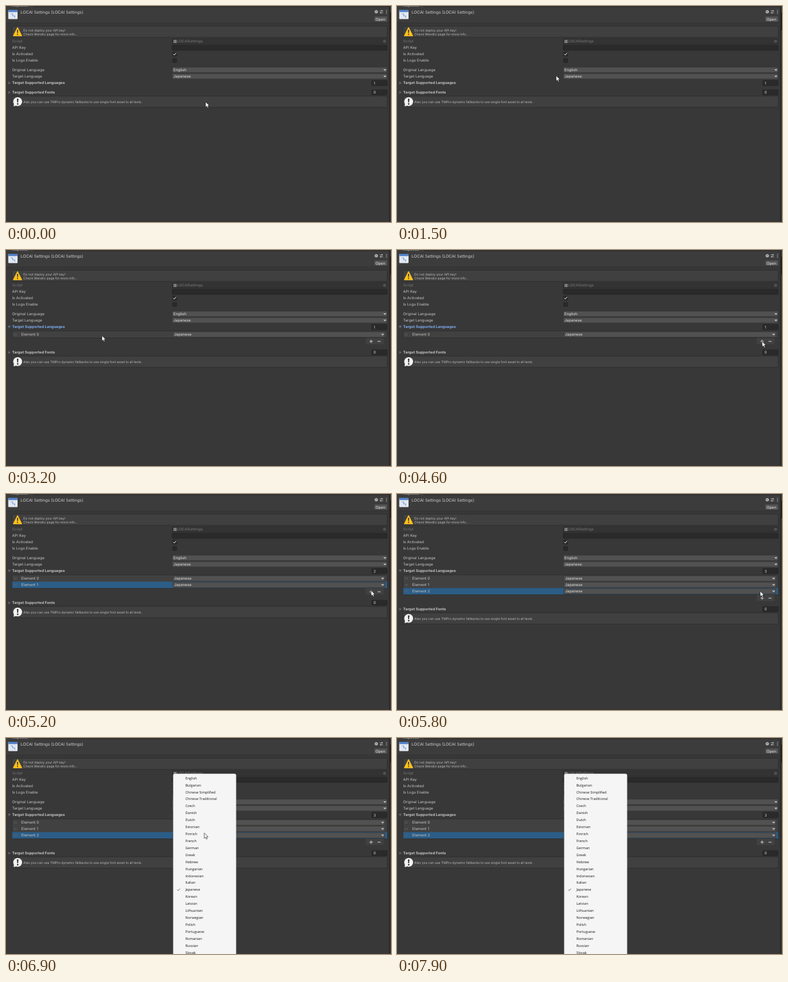
Animation, 600 px wide and 338 px high, one loop 8 s. Source, as an HTML page:

```html
<!DOCTYPE html>
<html lang="en">
<head>
<meta charset="utf-8">
<title>Settings inspector</title>
<style>
  html, body { margin: 0; width: 100%; height: 100%; overflow: hidden; background: #383838; }
  svg { display: block; width: 100vw; height: 100vh; }
  text { font-family: Inter, sans-serif; text-rendering: geometricPrecision; white-space: pre; }
  .menu text { font-family: "Open Sans", sans-serif; }
</style>
</head>
<body>
<svg id="stage" viewBox="0 0 600 338"></svg>
<script>
const LOOP = 8000, STEP = 100;
const OPEN_AT = 2400, ADD_AT = [4800, 5600], MENU_AT = 6510, MENU_FADE = 200;
const LABEL = '#c4c4c4', DIM = '#787878', FIELD = '#2a2a2a', BUTTON = '#515151', EDGE = '#282828', FOCUS = '#7eaef0';
const LANGUAGES = ('English,Bulgarian,Chinese Simplified,Chinese Traditional,Czech,Danish,Dutch,Estonian,' +
  'Finnish,French,German,Greek,Hebrew,Hungarian,Indonesian,Italian,Japanese,Korean,Latvian,' +
  'Lithuanian,Norwegian,Polish,Portuguese,Romanian,Russian,Slovak').split(',');

// Pointer stops: time, x, y
const STOPS = [
  [0, 311, 150], [300, 311, 150], [900, 352, 119], [1500, 248, 109], [1900, 130, 127],
  [2200, 62, 119], [2500, 62, 119], [3200, 149.5, 134], [4100, 569, 143], [4800, 569, 143],
  [5300, 569, 152], [5700, 566, 152], [5800, 566, 152], [6400, 309, 149], [6500, 309, 147],
  [6600, 309, 141.5], [7000, 309, 150], [7900, 308, 342], [8000, 308, 342]
];

const rect = (x, y, w, h, fill, more = '') =>
  `<rect x="${x}" y="${y}" width="${w}" height="${h}" fill="${fill}" ${more}/>`;
const path = (d, fill, more = '') => `<path d="${d}" fill="${fill}" ${more}/>`;
const line = (d, color, width = 0.8) => path(d, 'none', `stroke="${color}" stroke-width="${width}"`);
const circle = (x, y, r, fill, more = '') => `<circle cx="${x}" cy="${y}" r="${r}" fill="${fill}" ${more}/>`;
// y is the middle of the capitals
const text = (s, x, y, fill = LABEL, size = 5.88, weight = 400) =>
  `<text x="${x}" y="${y + size * 0.36}" fill="${fill}" font-size="${size}" font-weight="${weight}">${s}</text>`;

const box = (x, y, w, h, fill, edge = EDGE) =>
  rect(x, y, w, h, fill, `rx="1" stroke="${edge}" stroke-width=".6"`);
const tick = (x, y, color) => line(`M${x} ${y}l1.6 1.7l3-3.6`, color, 1);
const helpBox = y => box(9.3, y - 9, 585, 17.6, '#404040', '#272727');

function dropdown(value, x, right, y) {
  return box(x, y - 4.2, right - x, 8.4, BUTTON, '#303030') + text(value, x + 2, y, '#e0e0e0') +
    path(`M${right - 6} ${y - 1}h5l-2.5 2.6z`, LABEL);
}

function foldout(label, y, count, open, color = LABEL) {
  const arrow = open ? `M2.6 ${y - 1.8}h4.8l-2.4 4z` : `M3.6 ${y - 2.3}v4.6l3.6-2.3z`;
  return path(arrow, color === FOCUS ? '#55718f' : '#666') + text(label, 9.6, y, color, 5.8, 700) +
    box(570, y - 4, 24, 8, FIELD, '#202020') + text(count, 572.7, y, '#d2d2d2');
}

function header() {
  return rect(0, 0, 597, 26, '#3c3c3c') + rect(0, 0, 597, 2, '#323232') + rect(0, 0, 42, 2, '#3c3c3c') +
    text('Inspector', 9, -1.6) + line('M0 26.5H597', '#303030', 0.6) +
    rect(3.5, 6, 14.5, 14.5, '#e3e9f2', 'rx="1"') + rect(3.5, 6, 14.5, 3.4, '#4f7fc4', 'rx="1"') +
    line('M7.5 12.5h3v3h3v2.5', '#7ea3d8', 1.2) +
    text('LOCAI Settings (LOCAI Settings)', 22.8, 9.2, '#d0d0d0', 6.42) +
    circle(577, 9, 2.5, LABEL) + text('?', 575.6, 9, '#333', 4.4, 700) +
    line('M582.5 7.6h5M582.5 10.6h5M586 6.2v2.8M584 9.2v2.8', LABEL, 0.8) +
    [6.6, 9, 11.4].map(y => circle(593, y, 0.7, LABEL)).join('') +
    box(573.5, 16, 21, 8.8, '#555', '#303030') + text('Open', 576, 20.4, '#e8e8e8', 5.9);
}

function settings() {
  return helpBox(40.4) +
    path('M18 33.8L24.4 46.6H11.6z', '#fcc21b', 'stroke="#fcc21b" stroke-width="1.2" stroke-linejoin="round"') +
    path('M17.1 37.6h1.8l-.4 4.8h-1z', '#222') + circle(18, 44.4, 0.9, '#222') +
    text('Do not deploy your API key!', 27, 38, '#bdbdbd', 5.02) +
    text('Check Wendro page for more info...', 27, 43.9, '#bdbdbd', 5.02) +
    text('Script', 9.4, 55.3, DIM) + box(259, 51.2, 335, 8.2, '#333', '#2c2c2c') +
    rect(261, 53, 4.8, 4.8, '#8a8a8a') + line('M261 54.8h4.8M262.7 53v4.8', '#555', 0.5) +
    text('LOCAISettings', 266.6, 55.3, DIM) +
    circle(590, 55.3, 2, 'none', 'stroke="#777" stroke-width=".6"') + circle(590, 55.3, 0.8, '#777') +
    text('API Key', 9.4, 65.3) + box(259, 61.3, 335, 8, FIELD, '#202020') +
    text('Is Activated', 9.4, 75.3) + box(259.6, 72, 6.4, 6.4, FIELD, '#202020') + tick(260.6, 75.2, '#eee') +
    text('Is Logs Enable', 9.4, 85.3) + box(259.6, 82, 6.4, 6.4, FIELD, '#202020') +
    text('Original Language', 9.4, 100) + dropdown('English', 259, 594, 100) +
    text('Target Language', 9.4, 110) + dropdown('Japanese', 259, 594, 110);
}

function languageList(count) {
  const bottom = 127.2 + count * 10;
  let out = box(9.3, 126.6, 585, count * 10 + 1, '#414141') +
    path(`M560.5 ${bottom + 0.6}h28v8.6q0 1-1 1h-26q-1 0-1-1z`, '#414141');
  for (let i = 0; i < count; i++) {
    const y = 132.2 + i * 10;
    if (count > 1 && i === count - 1) out += rect(9.6, y - 5, 584.4, 10, '#2c5d87');
    out += line(`M12 ${y - 0.8}h5M12 ${y + 1}h5`, '#666', 0.6) +
      text('Element ' + i, 23.7, y) + dropdown('Japanese', 260, 590.5, y);
  }
  const y = bottom + 5.8;
  return out + line(`M566.4 ${y}h5.2M569 ${y - 2.6}v5.2M579 ${y}h4.8`, '#d0d0d0', 1);
}

function note(y) {
  return helpBox(y) + circle(18.2, y - 0.4, 6.9, '#f2f2f2') + path(`M12.6 ${y + 2}l-.6 5l5-1.5z`, '#f2f2f2') +
    path(`M17 ${y - 5}h2.4l-.5 6h-1.4z`, '#333') + circle(18.2, y + 3.2, 1.2, '#333') +
    text('Also you can use TMPro dynamic fallbacks to use single font asset to all texts.', 27, y, '#bdbdbd', 5.02);
}

function menu(alpha) {
  if (alpha <= 0) return '';
  const rowY = i => 62.7 + i * 10.92;
  return `<g class="menu" opacity="${alpha}">` +
    rect(260.6, 56, 98, 300, '#f5f5f5', 'rx="2.5" stroke="#b8b8b8" stroke-width=".5"') +
    LANGUAGES.map((name, i) => text(name, 279.4, rowY(i), '#1c1c1c', 5.52)).join('') +
    line(`M266.8 ${rowY(16)}l1.5 1.5l2.8-3.2`, '#333', 0.7) + '</g>';
}

function pointer(t) {
  const i = STOPS.findIndex(stop => stop[0] > t);
  const [t0, x0, y0] = STOPS[i - 1], [t1, x1, y1] = STOPS[i];
  const k = (t - t0) / (t1 - t0), e = k * k * (3 - 2 * k);
  return `<g transform="translate(${x0 + (x1 - x0) * e} ${y0 + (y1 - y0) * e})">` +
    path('M0 0V8.4L1.9 6.7L3.2 9.6L4.7 8.9L3.4 6.1H6z', '#fff', 'stroke="#111" stroke-width=".6"') + '</g>';
}

function scene(t) {
  const open = t >= OPEN_AT;
  const count = 1 + ADD_AT.filter(at => t >= at).length;
  const shift = open ? 15 + count * 10 : 0;
  const focused = open && count === 1;
  return rect(0, 0, 600, 338, '#383838') + header() + settings() +
    foldout('Target Supported Languages', 120.4, count, open, focused ? FOCUS : LABEL) +
    (open ? languageList(count) : '') +
    foldout('Target Supported Fonts', 135.2 + shift, 0, false) + note(150 + shift) +
    rect(597, 0, 1.2, 338, '#242424') + rect(598.8, 10, 1.2, 28, '#161616') +
    menu(Math.min(1, (t - MENU_AT) / MENU_FADE)) + pointer(t);
}

const stage = document.getElementById('stage');
let shown = -1;
function frame() {
  const t = Math.floor(performance.now() % LOOP / STEP) * STEP;
  if (t !== shown) stage.innerHTML = scene(shown = t);
  requestAnimationFrame(frame);
}
frame();
</script>
</body>
</html>
```
